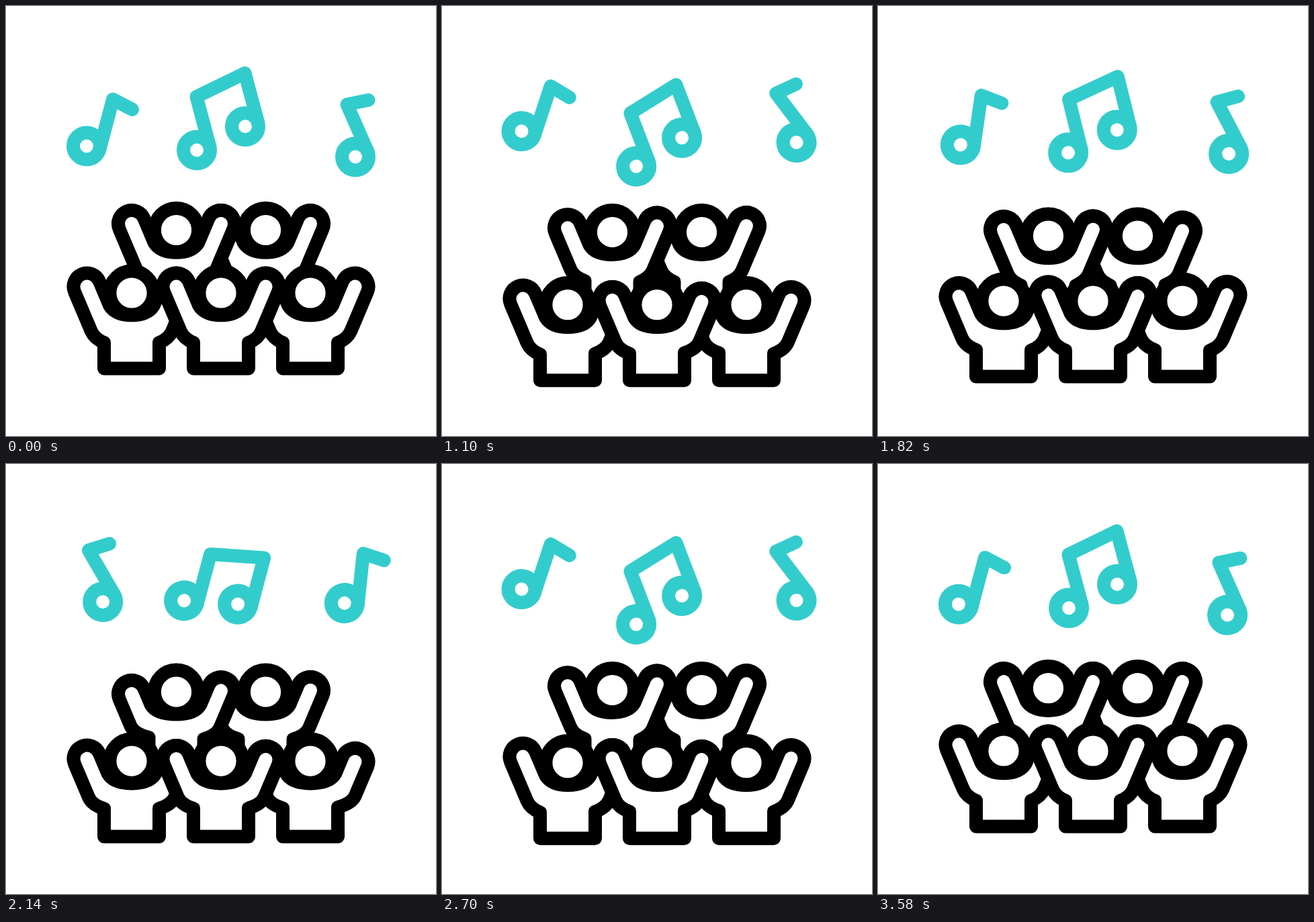
An HTML page with a canvas that plays this animation: 640x640 px, repeating every 3600 ms.

```html
<!DOCTYPE html>
<html lang="en">
<head>
<meta charset="utf-8">
<title>Cheering crowd</title>
<style>
  html, body { margin: 0; width: 100%; height: 100%; overflow: hidden; background: #fff; }
  canvas { display: block; width: 640px; height: 640px; }
</style>
</head>
<body>
<canvas id="stage" width="640" height="640"></canvas>
<script>
const ctx = document.getElementById('stage').getContext('2d');
const LOOP = 3600, STEP = 20, BEAT = 400;
const TEAL = '#33cccc';

const clamp = v => Math.min(1, Math.max(0, v));
const smooth = v => { const s = clamp(v); return s * s * (3 - 2 * s); };

// Eased wave of 0..1 with period two beats and a crest at the given time.
function wave(t, crest) {
  const period = 2 * BEAT;
  const d = (((t - crest) % period) + period) % period;
  return 1 - smooth(Math.min(d, period - d) / BEAT);
}

// Eased interpolation through [time, value] pairs.
function track(t, keys) {
  for (let i = 1; i < keys.length; i++) {
    const [t0, v0] = keys[i - 1], [t1, v1] = keys[i];
    if (t <= t1) return v0 + (v1 - v0) * smooth((t - t0) / (t1 - t0));
  }
  return keys[keys.length - 1][1];
}

function ring(x, y, r) {
  ctx.beginPath();
  ctx.arc(x, y, r, 0, 2 * Math.PI);
  ctx.stroke();
}

/* ---------- notes ---------- */

const notes = [
  { pivot: [144, 184], dir: -1, swing: [-45, 4.9, 13.5],
    heads: [[120, 208.5]], line: [[139.4, 213.5], [159, 139], [188, 154]] },
  { pivot: [320, 167], dir: 1, swing: [30, -7, -14],
    heads: [[284, 214.5], [356, 179.3]],
    line: [[303.3, 209.3], [283.5, 135], [355.5, 100], [375.3, 174]] },
  { pivot: [520, 192], dir: -1, swing: [30, -14.7, -21.3],
    heads: [[520, 224.5]], line: [[538.4, 216.7], [507.5, 146.5], [539.5, 140]] }
];

const bobKeys = [[0, 0]];
for (let i = 1; i < 9; i++) bobKeys.push([i * BEAT, i % 2 ? 30 : -30]);
bobKeys.push([LOOP, 0]);

function swingKeys([first, middle, last]) {
  return [[0, 0], [560, first], [1160, middle], [1600, last],
          [2160, first], [2760, middle], [3200, last], [LOOP, 0]];
}

function drawNote(note, t) {
  const [px, py] = note.pivot;
  ctx.save();
  ctx.translate(px, py + note.dir * track(t, bobKeys));
  ctx.rotate(track(t, swingKeys(note.swing)) * Math.PI / 180);
  ctx.translate(-px, -py);
  ctx.strokeStyle = TEAL;
  for (const [x, y] of note.heads) ring(x, y, 20);
  ctx.beginPath();
  note.line.forEach(([x, y]) => ctx.lineTo(x, y));
  ctx.stroke();
  ctx.restore();
}

/* ---------- crowd ---------- */

// Arm drop: size and crest time.
const frontArms = [[12, 740], [6.5, 520], [8, 470], [10.5, 565]];
const backArms = [[12.5, 570], [9.5, 650], [12.5, 720]];

function armDrop([size, crest], t) {
  return size * wave(t, crest) * smooth(t / 400) * (1 - smooth((t - 3220) / 340));
}

// Outline points of one side, for an arm lowered by a; y is relative to the head.
function side(a) {
  const slope = 0.424;
  const reach = 59 - 1.5 * a, inner = 36 - a;
  const elbow = [-85 + slope * reach, -1.7 + a + reach];
  const neck = [-48 + slope * inner, 19];
  return {
    hip: [-41, 112.5], waist: [-41, 74 - 0.5 * a],
    bend: [elbow[0] + 5, elbow[1] + 11], elbow,
    outer: [-85, -1.7 + a], tip: [-66.5, -9.5 + a],
    neck, c1: [neck[0] + 5.5, 28.5], c2: [-15 - a / 2, 33.3]
  };
}

function drawPerson(x, y, dropLeft, dropRight) {
  const l = side(dropLeft), r = side(dropRight);
  for (const key in r) r[key][0] *= -1;
  const tilt = Math.atan(0.424);

  ctx.save();
  ctx.translate(x, y);
  ctx.strokeStyle = '#000';
  ctx.fillStyle = '#fff';

  ctx.beginPath();
  ctx.moveTo(...l.hip);
  ctx.lineTo(...l.waist);
  ctx.quadraticCurveTo(...l.bend, ...l.elbow);
  ctx.lineTo(...l.outer);
  ctx.arc(...l.tip, 20, Math.PI - tilt, 2 * Math.PI - tilt);
  ctx.lineTo(...l.neck);
  ctx.bezierCurveTo(...l.c1, ...l.c2, 0, 33.3);
  ctx.bezierCurveTo(...r.c2, ...r.c1, ...r.neck);
  ctx.arc(...r.tip, 20, Math.PI + tilt, 2 * Math.PI + tilt);
  ctx.lineTo(...r.elbow);
  ctx.quadraticCurveTo(...r.bend, ...r.waist);
  ctx.lineTo(...r.hip);
  ctx.closePath();
  ctx.fill();
  ctx.stroke();

  ctx.beginPath();
  ctx.arc(0, 0, 32.6, 0, 2 * Math.PI);
  ctx.fill();
  ctx.stroke();
  ctx.restore();
}

function drawRow(people, y, arms, t) {
  const drops = arms.map(arm => armDrop(arm, t));
  for (const [x, i] of people) drawPerson(x, y, drops[i], drops[i + 1]);
}

function draw(t) {
  ctx.fillStyle = '#fff';
  ctx.fillRect(0, 0, 640, 640);
  ctx.lineWidth = 20;
  ctx.lineCap = ctx.lineJoin = 'round';

  const backLift = t < BEAT ? 0 : 20 * wave(t, 2 * BEAT);
  const frontLift = 21 * (t < 2800 ? wave(t, BEAT) : 1 - smooth((t - 2800) / 600));

  drawRow([[386.5, 1], [253.5, 0]], 333.5 + backLift, backArms, t);
  drawRow([[187, 0], [453, 2], [320, 1]], 427 + frontLift, frontArms, t);
  notes.forEach(note => drawNote(note, t));
}

const start = performance.now();
function tick() {
  const t = (performance.now() - start) % LOOP;
  draw(Math.floor(t / STEP) * STEP);
  requestAnimationFrame(tick);
}
tick();
</script>
</body>
</html>
```
